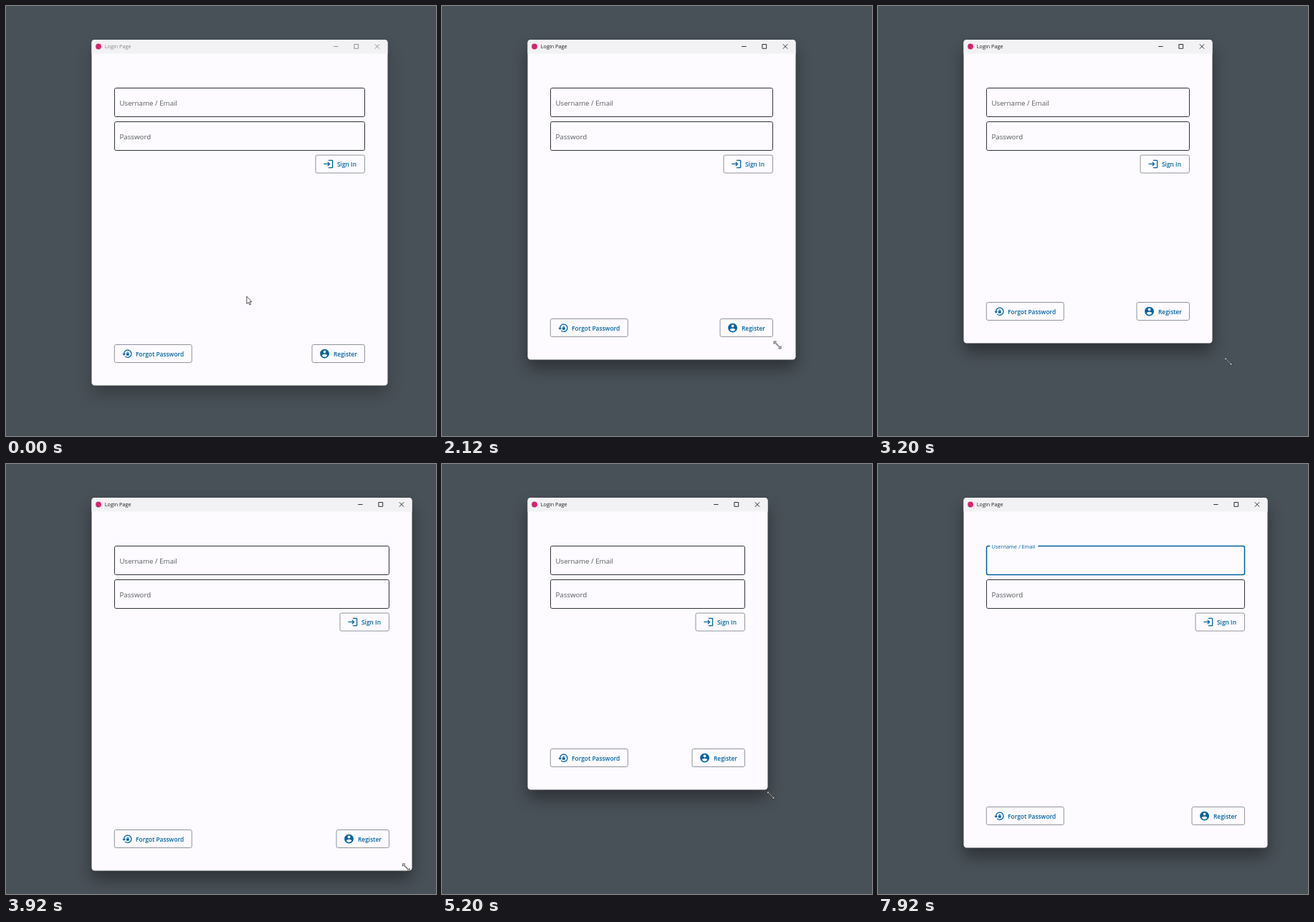
Recreate the animation shown at these times as an HTML page. Size 600 by 600 pixels, loop 8000 ms.

```html
<!DOCTYPE html>
<html lang="en">
<head>
<meta charset="utf-8">
<title>Login Page</title>
<style>
html, body { margin: 0; width: 100%; height: 100%; overflow: hidden; background: #495158; }
svg { display: block; width: 100vw; height: 100vh; }
text { font-family: "Open Sans", "Noto Sans", sans-serif; }
.label { font-size: 9.75px; font-weight: 500; fill: #565960; }
.btn text { font-size: 8.4px; font-weight: 600; fill: #0062a0; }
.btn path { fill: #0062a0; }
.btn rect { fill: none; stroke: #858991; stroke-width: .9; }
.field { fill: none; stroke: #303338; }
#shadow { filter: blur(11px); }
</style>
</head>
<body>
<svg viewBox="0 0 600 600">
  <rect width="600" height="600" fill="#495158"/>
  <rect id="shadow" x="119.5" y="59" rx="6"/>
  <rect id="rim" x="119.2" y="46.7" rx="4.5" fill="none" stroke="#3a4147" stroke-width=".6"/>
  <rect id="body" x="119.5" y="47" rx="4.2" fill="#fdfbff"/>
  <path id="bar" fill="#f2f2f4"/>
  <circle cx="129" cy="56.5" r="3.9" fill="#d6246f"/>
  <text id="title" x="137.8" y="59.3" font-size="7.25">Login Page</text>
  <path id="controls" fill="none" stroke-width=".9" d="M-75.3 56.5h6.4M-46.6 53.5h5.8v5.8h-5.8zM-17.7 53.3l6.4 6.4M-11.3 53.3l-6.4 6.4"/>

  <rect id="user" class="field" x="151.5" y="114.5" height="40" rx="2.2"/>
  <rect id="gap" y="113" height="3.5" fill="#fdfbff"/>
  <text id="userLabel" class="label">Username / Email</text>
  <rect id="caret" x="158.2" y="127.5" width="1.3" height="15" fill="#0062a0"/>
  <rect id="pass" class="field" x="151.5" y="161.5" height="40" rx="2.2"/>
  <text class="label" x="158.4" y="185.7">Password</text>

  <!-- buttons: origin at the top left corner -->
  <g id="signIn" class="btn">
    <rect width="68.5" height="25" rx="2.4"/>
    <path transform="translate(10.2 4.8) scale(.64)" d="M11 7L9.6 8.4l2.6 2.6H2v2h10.2l-2.6 2.6L11 17l5-5-5-5zm9 12h-8v2h8c1.1 0 2-.9 2-2V5c0-1.1-.9-2-2-2h-8v2h8v14z"/>
    <text x="30" y="16">Sign In</text>
  </g>
  <g id="forgot" class="btn">
    <rect width="108" height="25" rx="2.4"/>
    <path transform="translate(10.2 5) scale(.64)" d="M13 3c-4.97 0-9 4.03-9 9H1l4 4 4-4H6c0-3.86 3.14-7 7-7s7 3.14 7 7-3.14 7-7 7c-1.9 0-3.62-.76-4.88-1.99L6.7 18.42C8.32 20.01 10.55 21 13 21c4.97 0 9-4.03 9-9s-4.03-9-9-9zm2 8v-1c0-1.1-.9-2-2-2s-2 .9-2 2v1c-.55 0-1 .45-1 1v3c0 .55.45 1 1 1h4c.55 0 1-.45 1-1v-3c0-.55-.45-1-1-1zm-1 0h-2v-1c0-.55.45-1 1-1s1 .45 1 1v1z"/>
    <text x="29.8" y="16.2">Forgot Password</text>
  </g>
  <g id="register" class="btn">
    <rect width="73.5" height="25" rx="2.4"/>
    <path transform="translate(9.9 4.9) scale(.64)" d="M12 2C6.48 2 2 6.48 2 12s4.48 10 10 10 10-4.48 10-10S17.52 2 12 2zm0 3c1.66 0 3 1.34 3 3s-1.34 3-3 3-3-1.34-3-3 1.34-3 3-3zm0 14.2c-2.5 0-4.71-1.28-6-3.22.03-1.99 4-3.08 6-3.08 1.99 0 5.97 1.09 6 3.08-1.29 1.94-3.5 3.22-6 3.22z"/>
    <text x="30" y="16.2">Register</text>
  </g>

  <path id="arrow" d="M.4 .2V10.6L2.8 8.4 4.4 12 6 11.3 4.5 7.8H7.6z" fill="#fff" stroke="#222" stroke-width=".8"/>
  <path id="sizer" d="M-5-5H-1.6L-2.9-3.6 3.6 2.9 5 1.6V5H1.6L2.9 3.6-3.6-2.9-5-1.6z" fill="#fff" stroke="#1c1c1c" stroke-width=".7"/>
</svg>
<script>
const LOOP = 8000, BLUE = "#0062a0";
const el = {};
document.querySelectorAll("[id]").forEach(n => el[n.id] = n);

// Turning points of the dragged window corner and of the arrow
const drag = [
  { t: 1800, x: 532.5, y: 529.5 },
  { t: 2700, x: 393, y: 400 },
  { t: 3820, x: 569, y: 570 },
  { t: 4980, x: 448, y: 449 },
  { t: 6320, x: 543.5, y: 535.5 }
];
const approach = [
  { t: 60, x: 335.5, y: 405 },
  { t: 520, x: 543, y: 549 },
  { t: 720, x: 527, y: 526.5 }
];

const clamp = v => Math.min(1, Math.max(0, v));
const mix = (a, b, p) => a + (b - a) * p;
const ease = p => (1 - Math.cos(Math.PI * clamp(p))) / 2;

// Each leg eases in and out between two turning points
function follow(track, t) {
  const i = Math.max(0, track.findLastIndex(k => k.t <= t));
  const a = track[i], b = track[i + 1];
  if (!b) return a;
  const p = ease((t - a.t) / (b.t - a.t));
  return { x: mix(a.x, b.x, p), y: mix(a.y, b.y, p) };
}

function set(node, attrs) {
  for (const k in attrs) node.setAttribute(k, attrs[k]);
}
const place = (node, x, y) => set(node, { transform: `translate(${x} ${y})` });
const show = (node, on) => set(node, { visibility: on ? "visible" : "hidden" });
const snap = v => Math.floor(v) + .5;

function drawWindow(t) {
  const corner = follow(drag, t), r = snap(corner.x), b = snap(corner.y);
  const w = r - 119.5, h = b - 47, active = t >= 1600;
  const ink = active ? "#1c1c1c" : "#858585";
  set(el.body, { width: w, height: h });
  set(el.rim, { width: w + .6, height: h + .6 });
  set(el.shadow, { width: w, height: h, opacity: active ? .4 : .25 });
  set(el.bar, { d: `M119.5 66.5V51.2a4.2 4.2 0 0 1 4.2-4.2H${r - 4.2}a4.2 4.2 0 0 1 4.2 4.2V66.5z` });
  set(el.title, { fill: ink });
  set(el.controls, { stroke: ink });
  place(el.controls, r, 0);
  set(el.user, { width: r - 183.5 });
  set(el.pass, { width: r - 183.5 });
  place(el.signIn, r - 100.5, 208);
  place(el.forgot, 151.3, b - 57);
  place(el.register, r - 105.5, b - 57);
}

function drawFocus(t) {
  const p = ease((t - 6960) / 300), on = p > 0;
  el.user.style.stroke = on ? BLUE : "";
  el.user.style.strokeWidth = mix(1, 1.5, p);
  el.userLabel.style.fill = on ? BLUE : "";
  set(el.userLabel, { transform: `translate(158.4 ${mix(139, 118, p)}) scale(${mix(1, .755, p)})` });
  set(el.gap, { x: mix(189, 156.3, p), width: mix(0, 67, p) });
  show(el.caret, t >= 7100 && t < 7520);
}

function drawPointer(t) {
  const resizing = t >= 1320;
  const tip = follow(approach, t);
  const grip = follow(drag, t + 100); // the window trails the pointer by one tick
  show(el.arrow, !resizing);
  show(el.sizer, resizing && t < 6320);
  place(el.arrow, tip.x, tip.y);
  place(el.sizer, grip.x - 2, grip.y + 1.5);
}

function draw(now) {
  const ms = now % LOOP, part = ms % 200;
  const t = ms - part + (part >= 120 ? 120 : 0); // ticks of 120 and 80 ms
  drawWindow(t);
  drawFocus(t);
  drawPointer(t);
}

let start;
function frame(now) {
  start ??= now;
  draw(now - start);
  requestAnimationFrame(frame);
}
draw(0);
requestAnimationFrame(frame);
</script>
</body>
</html>
```
